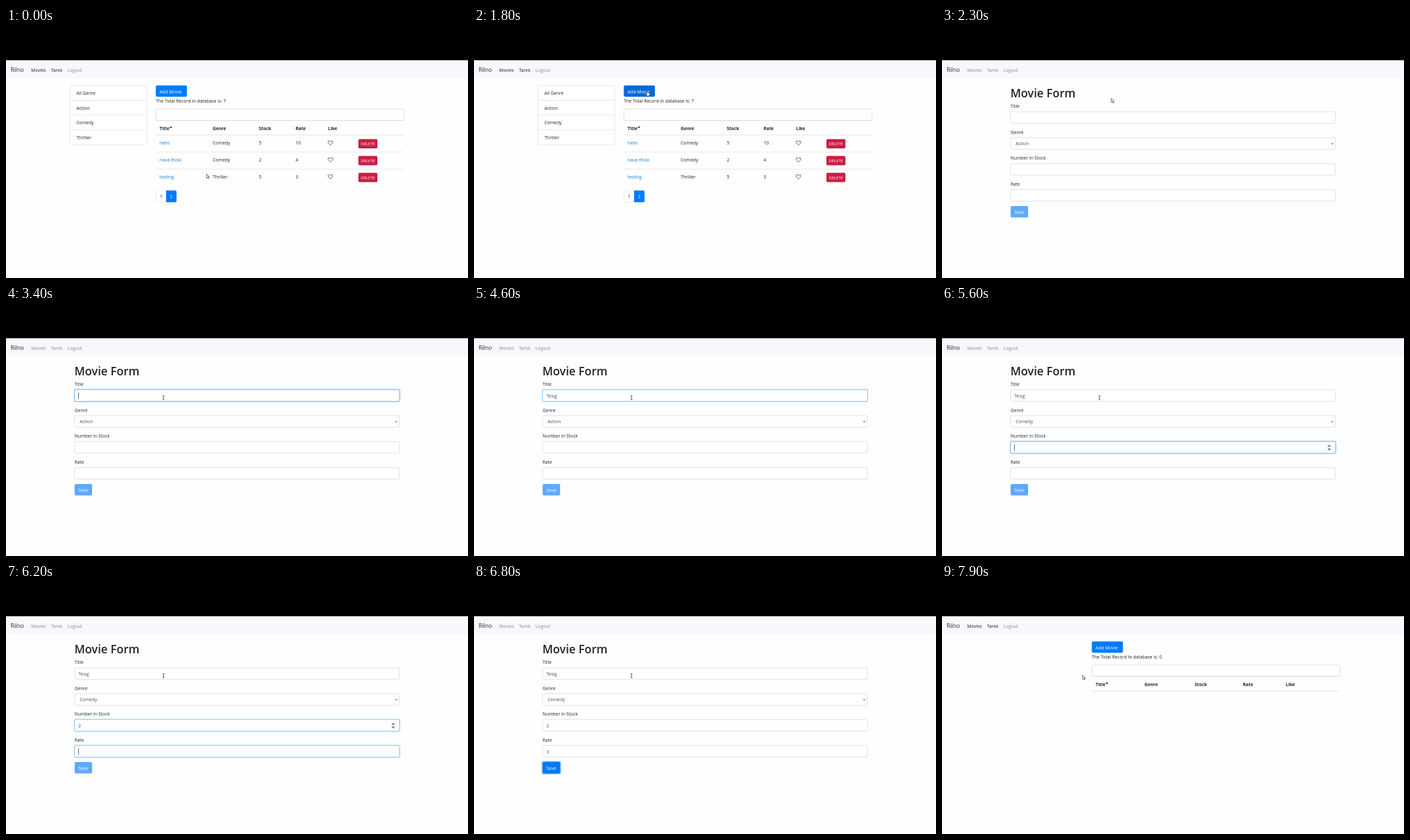
Animation, 704 px wide and 382 px high, one loop 8 s. Source, as an HTML page with a canvas:

```html
<!DOCTYPE html>
<html lang="en">
<head>
<meta charset="utf-8">
<title>Movie list and form</title>
<style>
  html, body { margin: 0; width: 100%; height: 100%; overflow: hidden; background: #fff; }
  canvas { display: block; width: 704px; height: 382px; }
</style>
</head>
<body>
<canvas id="stage"></canvas>
<script>
const W = 704, H = 382, LOOP = 8000, STEP = 100;
const INK = '#212529', FIELD = '#495057', BLUE = '#007bff', LINE = '#dee2e6';
const canvas = document.getElementById('stage');
const ctx = canvas.getContext('2d');
const dpr = window.devicePixelRatio || 1;
canvas.width = W * dpr;
canvas.height = H * dpr;

const between = (t, a, b) => t >= a && t < b;
const ease = p => p * p * (3 - 2 * p);

// y is the middle of the capitals
function text(str, x, y, color = INK, size = 6.9, weight = 400) {
  ctx.font = `${weight} ${size}px "Open Sans", "Noto Sans", sans-serif`;
  ctx.fillStyle = color;
  ctx.fillText(str, x, y + size * 0.37);
}

function box(x, y, w, h, fill, stroke, radius = 2) {
  ctx.beginPath();
  ctx.roundRect(x, y, w, h, radius);
  if (fill) { ctx.fillStyle = fill; ctx.fill(); }
  if (stroke) { ctx.strokeStyle = stroke; ctx.lineWidth = 0.7; ctx.stroke(); }
}

function rect(x, y, w, h, color) {
  ctx.fillStyle = color;
  ctx.fillRect(x, y, w, h);
}

function shape(points, fill, stroke, width = 0.7) {
  ctx.beginPath();
  points.forEach(([x, y]) => ctx.lineTo(x, y));
  if (fill) { ctx.closePath(); ctx.fillStyle = fill; ctx.fill(); }
  if (stroke) { ctx.strokeStyle = stroke; ctx.lineWidth = width; ctx.stroke(); }
}

function ring(x, y, w, h, alpha) {
  box(x - 1.4, y - 1.4, w + 2.8, h + 2.8, `rgba(0,123,255,${0.32 * alpha})`, null, 3);
}

// ---- Shared header ----
function header(linkColor) {
  rect(0, 0, W, H, '#fefefe');
  rect(0, 0, W, 49.5, '#000');
  rect(0, 49.5, W, 27.3, '#f8f8fc');
  text('Rilno', 7, 64, INK, 8.7);
  text('Movies', 38.3, 64, linkColor);
  text('Tarek', 68.5, 64, linkColor);
  text('Logout', 93.7, 64, '#8c8a8c');
}

// ---- List page ----
function heart(x, y) {
  ctx.beginPath();
  ctx.moveTo(x, y + 3.3);
  ctx.bezierCurveTo(x - 7, y - 2, x - 2, y - 5.2, x, y - 1.8);
  ctx.bezierCurveTo(x + 2, y - 5.2, x + 7, y - 2, x, y + 3.3);
  ctx.strokeStyle = '#33373b';
  ctx.lineWidth = 0.8;
  ctx.stroke();
}

function listTop(total, columns, t) {
  const hover = between(t, 1700, 2100);
  header('#222');
  if (between(t, 1900, 2100)) ring(228.3, 87.7, 47.4, 17.2, 1);
  box(228.3, 87.7, 47.4, 17.2, hover ? '#0069d9' : BLUE);
  text('Add Movie', 234, 97, '#fff');
  text('The Total Record in database is: ' + total, 228.2, 111.2);
  rect(228.3, 141, 378, 0.7, LINE);
  box(228.5, 123.8, 378, 17.2, '#fff', '#ced4da');
  ['Title', 'Genre', 'Stock', 'Rate', 'Like'].forEach((name, i) =>
    text(name, columns[i], 153, INK, 6.8, 700));
  shape([[249, 152.4], [251.3, 150], [253.6, 152.4]], INK);
  rect(228.3, 163, 378, 0.9, LINE);
}

function listPage(t) {
  const columns = [234, 315, 385.3, 441.3, 490.8];
  listTop(7, columns, t);

  box(97.5, 88, 117, 90.3, '#fff', '#dfdfdf');
  ['All Genre', 'Action', 'Comedy', 'Thriller'].forEach((name, i) => {
    if (i) rect(97.5, 87.6 + i * 22.6, 117, 0.7, '#dfdfdf');
    text(name, 107.2, 99.4 + i * 22.6);
  });

  const rows = [
    ['hello', 'Comedy', 5, 10],
    ['nava thoki', 'Comedy', 2, 4],
    ['testing', 'Thriller', 5, 3]
  ];
  rows.forEach((row, i) => {
    const y = 175.7 + i * 25.8;
    if (i) rect(228.3, y - 12.2, 378, 0.7, LINE);
    row.forEach((cell, c) => text(cell, columns[c], y, c ? INK : '#1a80cf'));
    heart(494.4, y);
    box(537, y - 6, 29, 14.3, '#cb1f44');
    text('DELETE', 541, y + 1.4, '#fff', 6.1);
  });

  box(228.5, 248.6, 16, 17.4, '#fff', LINE);
  box(244, 248.3, 15.8, 18, BLUE, null, [0, 2, 2, 0]);
  text('1', 234.3, 257.5);
  text('2', 249.8, 257.5, '#fff');
}

// ---- Form page ----
// focus: start, full strength, release, gone
const fields = [
  { label: 'Title', y: 128, focus: [2700, 2800, 4600, 4700] },
  { label: 'Genre', y: 167.7, focus: [4700, 4700, 5600, 5600] },
  { label: 'Number in Stock', y: 207.2, focus: [5600, 5600, 6200, 6300] },
  { label: 'Rate', y: 246.9, focus: [6200, 6300, 6700, 6800] }
];
const keyTimes = [3500, 3600, 3800, 4200, 4500];

function glow(t, [start, full, release, gone]) {
  if (!between(t, start, gone)) return 0;
  return between(t, full, release) ? 1 : 0.6;
}

function valuesAt(t) {
  return [
    'Tesig'.slice(0, keyTimes.filter(k => t >= k).length),
    t < 2300 ? '' : t < 5200 ? 'Action' : 'Comedy',
    t < 5900 ? '' : '2',
    t < 6600 ? '' : '3'
  ];
}

function formPage(t) {
  header('#8a8a8c');
  text('Movie Form', 104.3, 99.4, INK, 17.4, 600);

  const values = valuesAt(t);
  fields.forEach(({ label, y, focus }, i) => {
    const isSelect = i === 1;
    const strength = glow(t, focus);
    const middle = y + 9.2;
    text(label, 104.5, y - 8.7);
    if (strength) ring(104.6, y, 495, 17.6, strength);
    box(104.6, y, 495, 17.6, '#fff', strength ? '#80bdff' : '#ced4da');
    text(values[i], isSelect ? 112.2 : 110.2, middle, FIELD);

    if (isSelect) {
      shape([[593.1, middle - 1.1], [594.8, middle + 0.7], [596.5, middle - 1.1]], null, '#333', 0.9);
    } else if (between(t, focus[0], focus[2]) && !between(t, 3100, 3400)) {
      rect(110.3 + ctx.measureText(values[i]).width, middle - 5, 0.7, 9.8, '#222');
    }
    if (i === 2 && strength) {
      rect(586.5, middle - 5.5, 7, 11, '#efefef');
      for (const d of [-1, 1])
        shape([[588, middle + d * 1.6], [590, middle + d * 3.8], [592, middle + d * 1.6]], '#444');
    }
  });

  const saveGlow = glow(t, [6700, 6800, 7500, 7500]);
  if (saveGlow) ring(104.6, 272, 26.6, 17.4, saveGlow * 1.6);
  box(104.6, 272, 26.6, 17.4, t < 6600 ? '#5fa9fb' : saveGlow ? '#0579f2' : BLUE);
  text('Save', 110.3, 281, '#fff');
}

// ---- Pointer ----
const pointers = {
  arrow() {
    shape([[0, 0], [0, 6.3], [1.5, 5], [2.5, 7.2], [3.5, 6.8], [2.6, 4.6], [4.5, 4.5], [0, 0]], '#fff', '#333');
  },
  hand() {
    shape([[-0.8, 0], [0.5, 0], [0.6, 2.6], [3.4, 3.4], [3.5, 5.4], [2.7, 7.8], [-0.8, 7.8],
      [-2.8, 4.9], [-2, 4.2], [-0.8, 5.2], [-0.8, 0]], '#fff', '#333');
  },
  beam() {
    rect(-0.4, -3, 0.8, 6, '#333');
    rect(-1.6, -3.2, 3.2, 0.7, '#333');
    rect(-1.6, 2.6, 3.2, 0.7, '#333');
  }
};

const path = [
  [1100, 305.6, 223], [1500, 272, 71], [1800, 264.3, 96],
  [2200, 264.3, 96], [2500, 240, 140], [7800, 240, 140], [7900, 214.3, 139.2]
];

function pointerAt(t) {
  const next = path.findIndex(p => p[0] > t);
  if (next === 0) return path[0].slice(1);
  if (next < 0) return path[path.length - 1].slice(1);
  const [t0, x0, y0] = path[next - 1], [t1, x1, y1] = path[next];
  const p = ease((t - t0) / (t1 - t0));
  return [x0 + (x1 - x0) * p, y0 + (y1 - y0) * p];
}

function drawPointer(t) {
  const [x, y] = pointerAt(t);
  const kind = between(t, 1700, 2300) ? 'hand' : between(t, 2400, 7900) ? 'beam' : 'arrow';
  ctx.save();
  ctx.translate(x, y);
  pointers[kind]();
  ctx.restore();
}

function render(now) {
  const t = Math.floor(now % LOOP / STEP) * STEP;
  ctx.setTransform(dpr, 0, 0, dpr, 0, 0);
  if (t < 2100) listPage(t);
  else if (t < 7500) formPage(t);
  else listTop(0, [234, 308.6, 385, 458.6, 523.8], t);
  drawPointer(t);
}

const began = performance.now();
function tick() {
  render(performance.now() - began);
  requestAnimationFrame(tick);
}
tick();
</script>
</body>
</html>
```
